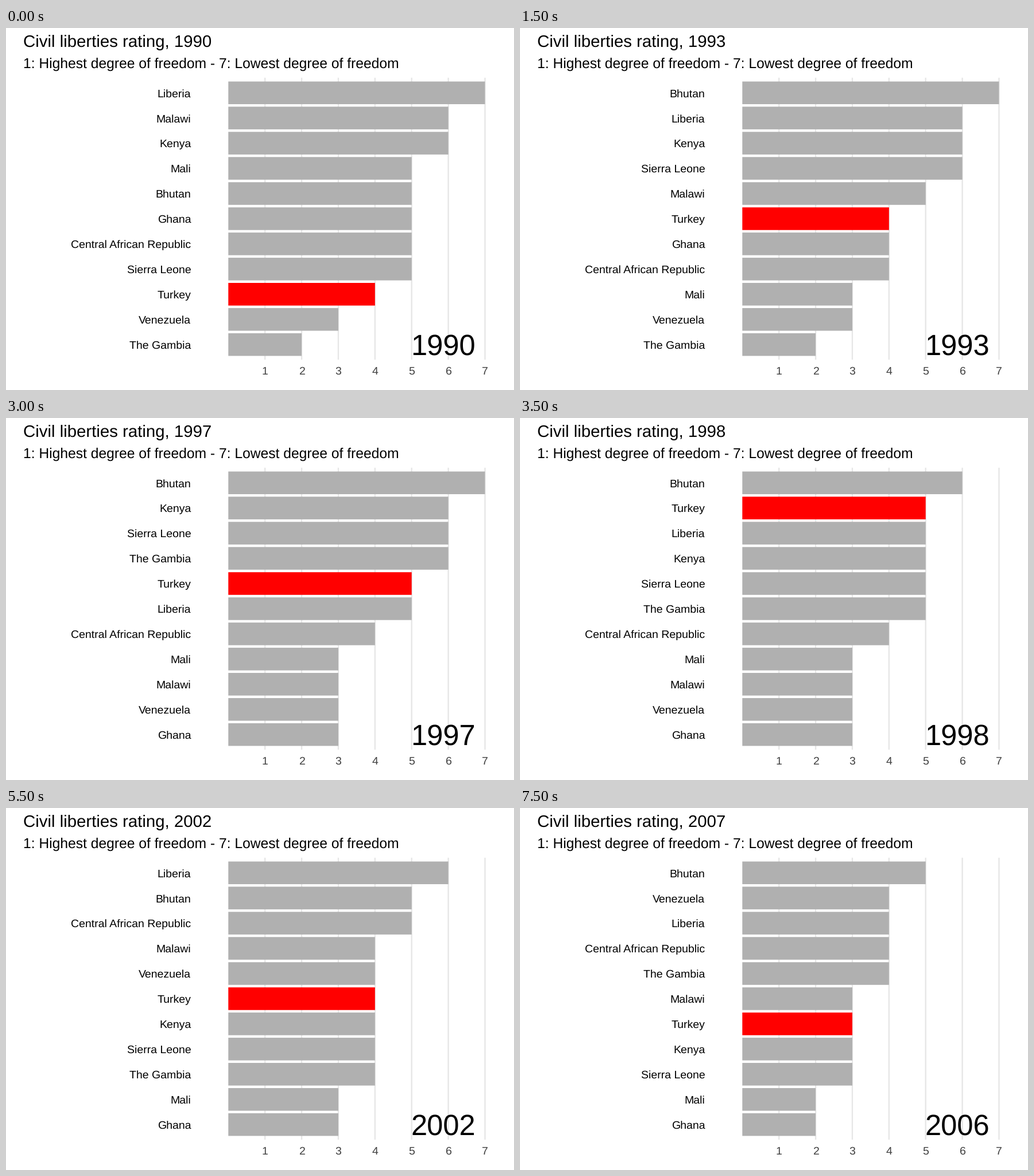
These frames come from a looping animation (885x632 px, 8 s). A matplotlib script:

```python
import math

import matplotlib.pyplot as plt
import numpy as np
from matplotlib.animation import FuncAnimation
from matplotlib.patches import Rectangle

plt.rcParams["font.family"] = "Liberation Sans"
plt.rcParams["text.hinting"] = "none"

W, H, DPI = 885, 632, 64
FRAMES, INTERVAL = 16, 500
START, END = 1990, 2006

X0, UNIT = 387.3, 63.88          # bar origin and width of one rating point
ROW0, PITCH = 113.2, 43.95       # first row centre and row spacing
BAR_H = 0.9 * PITCH
TITLE, SUBTITLE, SMALL, BIG = 29.33, 24.66, 19.45, 50.6   # text sizes in pixels

GREY, RED, GRID, TICK = "#b0b0b0", "#ff0000", "#e6e6e6", "#404040"


def trend(first, *turns, last):
    """Rating that drifts in straight lines through a few turning points."""
    years, levels = zip((START, first), *turns, (END, last))
    return lambda year: math.floor(np.interp(year, years, levels) + 0.5)


# Listing order settles ties.
REFORM = (1993, 6.4), (2001, 4.8), (2003, 3)
TRENDS = {
    "Mali": trend(5, (1992.5, 2.6), (1994, 3.6), last=2),
    "Bhutan": trend(4.5, (1993, 7.4), last=4.55),
    "Malawi": trend(5.8, (1992, 7), (1994, 2.5), (2005, 3.9), last=3),
    "Venezuela": trend(3, (1998, 3), (2000, 4.9), last=3.6),
    "Turkey": trend(4.1, (2000, 5.2), last=2.56),
    "Liberia": trend(6.5, (1997, 5.3), (2003, 5.8), (2004, 4), last=4),
    "Kenya": trend(6, (1992, 5), *REFORM, last=3),
    "Ghana": trend(5.4, (1996, 3.4), last=2),
    "Central African Republic": trend(4.9, (1998, 3.7), (2003, 5.2), last=4),
    "Sierra Leone": trend(5, *REFORM, last=3),
    "The Gambia": trend(2, (1993, 2), (1994, 6.2), last=3.55),
}


def ranking(year):
    """Countries with ratings, worst first; the stable sort keeps tie order."""
    rows = [(name, rate(year)) for name, rate in TRENDS.items()]
    return sorted(rows, key=lambda row: -row[1])


fig = plt.figure(figsize=(W / DPI, H / DPI), dpi=DPI, facecolor="white")
ax = fig.add_axes([0, 0, 1, 1])
ax.set_xlim(0, W)
ax.set_ylim(H, 0)
ax.axis("off")


def label(x, y, text, px, **kw):
    return ax.text(x, y, text, fontsize=px * 72 / DPI, va="baseline", **kw)


def box(x, y, w, h, color, z):
    return ax.add_patch(Rectangle((x, y), w, h, fc=color, lw=0,
                                  snap=False, zorder=z))


top = ROW0 - 0.6 * PITCH
height = (len(TRENDS) + 0.2) * PITCH
for value in range(1, 8):
    x = X0 + UNIT * value
    box(x - 1.15, top, 2.3, height, GRID, 1)
    label(x - 0.278 * SMALL, 605, str(value), SMALL, color=TICK)

title = label(30, 33, "", TITLE)
label(30, 70, "1: Highest degree of freedom - 7: Lowest degree of freedom", SUBTITLE)
big_year = label(705.6, 571, "", BIG, zorder=4)

bars, names = [], []
for i in range(len(TRENDS)):
    cy = ROW0 + PITCH * i
    bars.append(box(X0, cy - BAR_H / 2, 0, BAR_H, GREY, 2))
    names.append(label(322.3, cy + 7.2, "", SMALL, ha="right"))


def update(k):
    # The clock runs 1.1 years per step: the title rounds halves up, the data down.
    title_year = START + (11 * k + 5) // 10
    year = START + (11 * k + 4) // 10
    title.set_text(f"Civil liberties rating, {title_year}")
    big_year.set_text(str(year))
    for bar, text, (name, value) in zip(bars, names, ranking(year)):
        bar.set_width(UNIT * value)
        bar.set_facecolor(RED if name == "Turkey" else GREY)
        text.set_text(name)
    return [title, big_year, *bars, *names]


anim = FuncAnimation(fig, update, frames=FRAMES, interval=INTERVAL,
                     repeat=True, repeat_delay=0)
plt.show()
```
